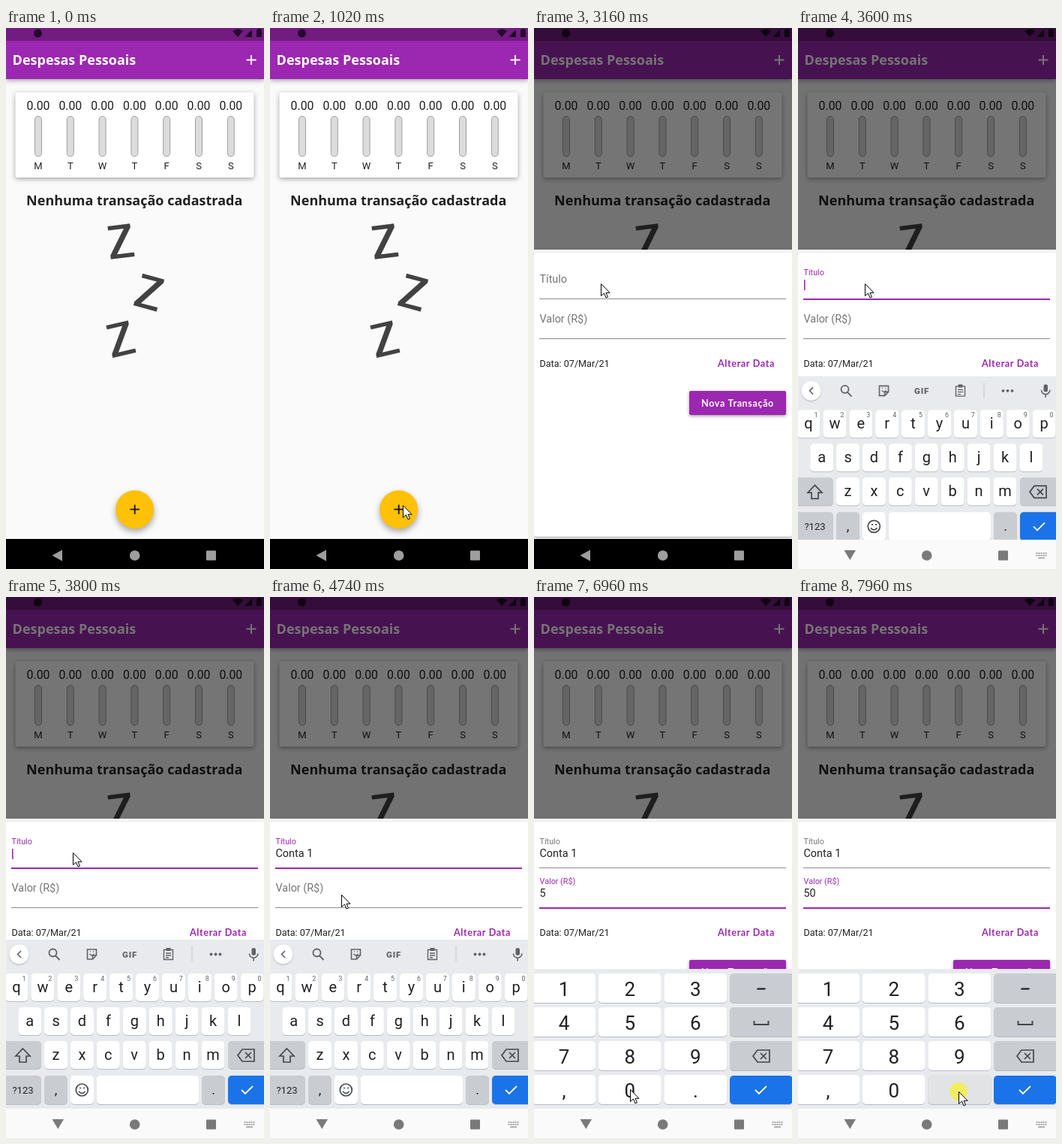
These frames come from a looping animation (344 by 720 pixels, 8000 ms). An HTML page with a canvas:

```html
<!DOCTYPE html>
<html lang="pt">
<head>
<meta charset="utf-8">
<style>
html, body { margin: 0; width: 100%; height: 100%; overflow: hidden; background: #fafafa; }
canvas { display: block; }
</style>
</head>
<body>
<canvas id="stage" width="344" height="720"></canvas>
<script>
const ctx = document.getElementById('stage').getContext('2d');
const LOOP = 8000;
const PURPLE = '#9c27b0', INK = '#202124', ICON = '#5f6368', DARK_KEY = '#c9ccd1', BLUE = '#1a73e8';

// Mouse path: time, x, y
const MOUSE = [
  [170, 336, 606], [470, 255, 618], [870, 177, 635], [1560, 177, 635], [1760, 166, 601],
  [2060, 164, 569], [2260, 158, 535], [2660, 115, 410], [2960, 89, 340], [4540, 89, 340],
  [4740, 95, 396], [4840, 95, 400], [5460, 95, 400], [5860, 124, 583], [5960, 124, 574],
  [6560, 124, 574], [6860, 128, 655], [7460, 128, 655], [7760, 214, 668], [7860, 214, 668], [7960, 214, 658]
];
const CLICKS = [[1340, 1500], [3260, 3420], [5040, 5200], [6360, 6500], [7260, 7400], [7940, 8000]];
const PRESSES = { '5': CLICKS[3], '0': CLICKS[4], '.': CLICKS[5] };

const STARTS = [170, 1760, 3600, 4440, 5340, 5460];
function hold(t) {
  const start = STARTS.filter(s => s <= t).pop();
  return start === undefined ? 0 : start + Math.floor((t - start) / 100) * 100;
}
const clamp = v => Math.max(0, Math.min(1, v));
const ease = (t, from, length) => 1 - (1 - clamp((t - from) / length)) ** 3;
const within = (t, [from, to]) => t >= from && t < to;

function fill(d, color) {
  ctx.fillStyle = color;
  ctx.fill(new Path2D(d));
}
function stroke(d, color, width = 1.6) {
  ctx.strokeStyle = color;
  ctx.lineWidth = width;
  ctx.stroke(new Path2D(d));
}
function rect(x, y, w, h, color) {
  ctx.fillStyle = color;
  ctx.fillRect(x, y, w, h);
}
function box(x, y, w, h, r, color, border) {
  ctx.beginPath();
  ctx.roundRect(x, y, w, h, r);
  ctx.fillStyle = color;
  ctx.fill();
  if (border) { ctx.strokeStyle = border; ctx.lineWidth = 1; ctx.stroke(); }
}
function dot(x, y, r, color) {
  ctx.beginPath();
  ctx.arc(x, y, r, 0, 7);
  ctx.fillStyle = color;
  ctx.fill();
}
function ring(x, y, r, color, width) {
  ctx.beginPath();
  ctx.arc(x, y, r, 0, 7);
  ctx.strokeStyle = color;
  ctx.lineWidth = width;
  ctx.stroke();
}
function text(s, x, y, font, color, align = 'left', spacing = 0) {
  ctx.font = font;
  ctx.fillStyle = color;
  ctx.textAlign = align;
  ctx.letterSpacing = spacing + 'px';
  ctx.fillText(s, x, y);
}
const roboto = size => size + 'px Roboto, sans-serif';
const TITLE = 'bold 18px "Open Sans", sans-serif';
const BUTTON = 'bold 12.6px Lato, sans-serif';

function shadowed(blur, dy, alpha, draw) {
  ctx.save();
  ctx.shadowColor = `rgba(0,0,0,${alpha})`;
  ctx.shadowBlur = blur;
  ctx.shadowOffsetY = dy;
  draw();
  ctx.restore();
}

function letterZ(x, y, degrees) {
  ctx.save();
  ctx.translate(x, y);
  ctx.rotate(degrees * Math.PI / 180);
  fill('M-15-22H15V-17L-7 16.5H16V22H-16V17L6-16.5H-15Z', '#424242');
  ctx.restore();
}

function drawHome() {
  rect(0, 0, 344, 720, '#fafafa');
  shadowed(6, 2, .35, () => rect(0, 0, 344, 68, PURPLE));
  rect(0, 0, 344, 17, 'rgba(0,0,0,.27)');
  dot(42.5, 7, 5.5, '#24092a');
  fill('M302 4Q309-1 316 4L309 12Z', '#24092a');
  fill('M318 12L328 2V12Z', '#24092a');
  fill('M334 2h2v-1h3v1h2v10h-7Z', '#24092a');
  text('Despesas Pessoais', 8.6, 49, TITLE, '#fff');
  stroke('M320.5 42.5H333.5M327 36V49', '#fff', 2);

  shadowed(6, 2, .35, () => box(12.5, 85.5, 318, 113.5, 3, '#fff'));
  [...'MTWTFSS'].forEach((day, i) => {
    const x = 43 + i * 42.8;
    text('0.00', x, 109, roboto(15.8), INK, 'center');
    box(x - 4.5, 117.5, 9, 53.5, 4.5, '#dcdcdc', '#9e9e9e');
    text(day, x, 188, roboto(13), INK, 'center');
  });

  text('Nenhuma transação cadastrada', 171.2, 236, TITLE, '#212121', 'center');
  letterZ(153, 284, -7);
  letterZ(191, 352, 15);
  letterZ(153, 414, -13);

  shadowed(8, 4, .35, () => dot(171.7, 640.7, 25.5, '#ffc107'));
  stroke('M165.5 640.7H178M171.7 634.5V647', '#111', 1.8);
}

// Text field whose label floats up while `lift` goes from 0 to 1
function field(label, value, top, lift, focused, caret) {
  const color = focused ? PURPLE : '#757575';
  text(label, 7.5, top + 19 - 10 * lift, roboto(14.4 - 3.6 * lift), color);
  text(value, 7.5, top + 26, roboto(14.4), INK);
  if (caret) rect(8 + ctx.measureText(value).width, top + 15, 1.6, 14, PURPLE);
  rect(7, top + 40, 329, focused ? 2 : 1, focused ? PURPLE : '#8c8c8c');
}

function drawSheet(t) {
  const shown = ease(t, 2200, 320);
  if (!shown) return;
  rect(0, 0, 344, 680, `rgba(0,0,0,${.54 * shown})`);

  const typed = Math.max(0, Math.min(7, Math.floor((t - 3880) / 55) + 1));
  const title = 'Conta 1'.slice(0, typed);
  const amount = t >= 7320 ? '50' : t >= 6420 ? '5' : '';
  const onTitle = t >= 3400 && t < 5300, onAmount = t >= 5300;
  const lastEdit = [3400, 4210, 5300, 6420, 7320].filter(e => e <= t).pop();
  const caret = (t - lastEdit) % 1000 < 500;

  ctx.save();
  ctx.translate(0, (1 - shown) * 385);
  rect(0, 295, 344, 385, '#fafafa');
  shadowed(3, 1, .4, () => box(0, 299, 344, 378, 3, '#fff'));
  field('Título', title, 320, ease(t, 3400, 200), onTitle, onTitle && caret);
  field('Valor (R$)', amount, 373, ease(t, 5280, 200), onAmount, onAmount && caret);
  text('Data: 07/Mar/21', 7.5, 451, roboto(12.6), INK);
  text('Alterar Data', 283, 450.5, BUTTON, PURPLE, 'center', .6);
  shadowed(4, 1.5, .4, () => box(207, 483, 129, 32, 2, PURPLE));
  text('Nova Transação', 271.5, 503.5, BUTTON, '#fff', 'center', .6);
  ctx.restore();
}

function key(x, y, w, h, color = '#fff') {
  box(x, y + 1, w, h, 5, '#b9bcc1');
  box(x, y, w, h, 5, color);
}
function backspace(x, y) {
  stroke(`M${x - 11} ${y}l6-8h16v16h-16ZM${x - 1} ${y - 4}l8 8m0-8l-8 8`, '#44474b', 1.7);
}
function enterKey(x, w, h) {
  key(x, 637, w, h, BLUE);
  stroke(`M${x + w / 2 - 8} 656l5 5l10-10`, '#fff', 1.8);
}

function drawToolbar() {
  shadowed(2, 1, .25, () => dot(17.5, 475.5, 13, '#fff'));
  stroke('M20 471l-4.5 4.5l4.5 4.5', ICON);
  ring(62.5, 473.5, 5, ICON, 1.8);
  stroke('M66 477.5L71.5 483', ICON, 2);
  stroke('M108.5 469h12v8l-5 5h-7ZM120.5 477h-5v5', ICON);
  stroke('M111.5 475q3 3.5 6 0M112 472h1M116 472h1', ICON, 1.4);
  text('GIF', 165, 479.5, '900 11.5px Roboto, sans-serif', ICON, 'center', .8);
  stroke('M210.5 469.5h12v13h-12ZM213 474h7M213 477h7M213 480h4', ICON, 1.4);
  rect(213.5, 467, 6, 4, ICON);
  rect(247.5, 465, 1, 20, '#c4c7cb');
  for (const x of [273.5, 279.5, 285.5]) dot(x, 475.5, 1.9, ICON);
  box(327.5, 467, 5.5, 10, 2.7, ICON);
  stroke('M324.5 474.5a5.7 5.7 0 0 0 11.4 0M330.2 480.5v4', ICON);
}

function drawLetters() {
  rect(0, 456, 344, 225, '#e8eaed');
  drawToolbar();
  const rows = [['qwertyuiop', 14], ['asdfghjkl', 31.7], ['zxcvbnm', 66.5]];
  rows.forEach(([letters, first], row) => [...letters].forEach((c, i) => {
    const x = first + i * 34.9, y = 501 + row * 45;
    key(x - 15.5, y, 31, 37);
    text(c, x, y + 24.5, roboto(20), INK, 'center');
    if (!row) text((i + 1) % 10, x + 10, y + 10, roboto(9), ICON, 'center');
  }));
  key(-4, 591, 51, 37, DARK_KEY);
  stroke('M22.5 601l9.5 10h-5v8h-9v-8h-5Z', '#44474b', 1.7);
  key(296, 591, 52, 37, DARK_KEY);
  backspace(320, 610);
  key(-4, 637, 51, 38, DARK_KEY);
  text('?123', 22.5, 661, roboto(13), INK, 'center');
  key(51, 637, 31, 38, DARK_KEY);
  text(',', 66.5, 662, roboto(18), INK, 'center');
  key(86, 637, 31, 38);
  ring(101.3, 656, 8, '#44474b', 1.7);
  stroke('M97 658q4.3 5 8.6 0M98 653.5h2M103 653.5h2', '#44474b', 1.7);
  key(120.5, 637, 136.5, 38);
  key(261, 637, 31, 38, DARK_KEY);
  text('.', 276.5, 662, roboto(18), INK, 'center');
  enterKey(296, 52, 38);
}

function drawNumbers(t) {
  rect(0, 495, 344, 186, '#e8eaed');
  [...'123456789,0.'].forEach((c, i) => {
    const x = -2 + (i % 3) * 87.7, y = 501 + Math.floor(i / 3) * 45;
    const pressed = PRESSES[c] && within(t, PRESSES[c]);
    key(x, y, 84, 39, pressed ? '#e2e3e5' : '#fff');
    text(c, x + 42, y + 30, roboto(26), INK, 'center');
  });
  for (const y of [501, 546, 591]) key(261, y, 87, 39, DARK_KEY);
  stroke('M297.5 521.5h11', INK, 2.2);
  stroke('M293.5 564v5h19v-5', '#44474b', 2);
  backspace(303, 611);
  enterKey(261, 84, 38);
}

function drawNavigation(light) {
  const color = light ? '#7a7a7a' : '#9e9e9e';
  rect(0, light ? 681 : 680, 344, 40, light ? '#fafafa' : '#000');
  fill(light ? 'M61.5 695h15.5l-7.7 13Z' : 'M61.5 702l13.5-7.5v15Z', color);
  dot(171.7, 702, 6.8, color);
  box(267, 695.5, 13, 13, 1, color);
  if (light) {
    ctx.setLineDash([2, 1]);
    stroke('M317.5 699h14M317.5 702h14', '#a5a5a5', 2);
    ctx.setLineDash([]);
    rect(320, 704.5, 9, 1.8, '#a5a5a5');
  }
}

function drawMouse(t) {
  if (t < MOUSE[0][0]) return;
  let i = MOUSE.findIndex(p => p[0] > t);
  if (i < 0) i = MOUSE.length - 1;
  const [t0, x0, y0] = MOUSE[i - 1], [t1, x1, y1] = MOUSE[i];
  const p = clamp((t - t0) / (t1 - t0));
  const x = x0 + (x1 - x0) * p, y = y0 + (y1 - y0) * p;
  if (CLICKS.some(c => within(t, c))) dot(x, y, 12, 'rgba(243,238,88,.92)');
  ctx.save();
  ctx.translate(x + .5, y + .5);
  const arrow = 'M0 0V16L4 12.5L6.5 18.5L9 17.5L6.5 11.8H11.5Z';
  fill(arrow, '#fff');
  stroke(arrow, '#000', 1);
  ctx.restore();
}

function draw(now) {
  const t = hold(now % LOOP);
  const rise = ease(t, 3430, 250);
  drawHome();
  drawSheet(t);
  if (rise) {
    ctx.save();
    ctx.translate(0, (1 - rise) * 225);
    if (t < 5200) drawLetters(); else drawNumbers(t);
    ctx.restore();
  }
  drawNavigation(rise > 0);
  drawMouse(t);
  requestAnimationFrame(draw);
}
requestAnimationFrame(draw);
</script>
</body>
</html>
```
